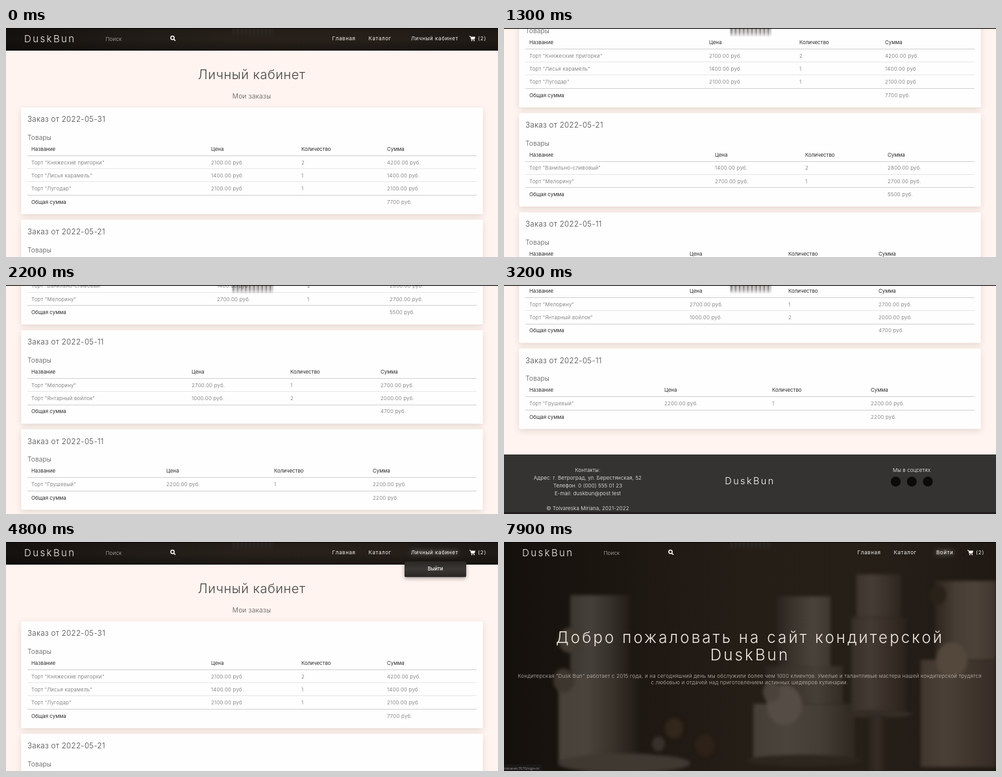
Animation, 758 px wide and 354 px high, one loop 8000 ms. Source, as an HTML page with a canvas:

```html
<!DOCTYPE html>
<html lang="ru">
<head>
<meta charset="utf-8">
<title>Личный кабинет</title>
<style>
  html, body { margin: 0; width: 100%; height: 100%; overflow: hidden; background: #fff4ef; }
  canvas { display: block; width: 758px; height: 354px; }
</style>
</head>
<body>
<canvas id="stage"></canvas>
<script>
const W = 758, H = 354, LOOP = 8000;
const BRAND = 'DuskBun';
const SANS = 'Inter, "Open Sans", sans-serif';
const ratio = window.devicePixelRatio || 1;
const stage = document.getElementById('stage');
stage.width = W * ratio;
stage.height = H * ratio;
const ctx = stage.getContext('2d');

const orders = [
  { date: '2022-05-31', cols: [39, 316, 455, 587], total: 7700,
    rows: [['Княжеские пригорки', 2100, 2], ['Лисья карамель', 1400, 1], ['Лугодар', 2100, 1]] },
  { date: '2022-05-21', cols: [39, 325, 464, 591], total: 5500,
    rows: [['Ванильно-сливовый', 1400, 2], ['Мелорину', 2700, 1]] },
  { date: '2022-05-11', cols: [39, 286, 438, 577], total: 4700,
    rows: [['Мелорину', 2700, 1], ['Янтарный войлок', 1000, 2]] },
  { date: '2022-05-11', cols: [39, 247, 413, 565], total: 2200,
    rows: [['Грушевый', 2200, 1]] }
];

// [time, scroll offset]
const scrollKeys = [[500, 0], [800, 81], [1700, 231], [2300, 410], [2500, 505],
  [3200, 505], [3300, 462], [3800, 144], [4000, 6], [4100, 0]];

const clamp = v => Math.max(0, Math.min(1, v));
const ramp = (t, from, to) => clamp((t - from) / (to - from));

function scrollAt(t) {
  for (let i = 1; i < scrollKeys.length; i++) {
    const [t0, y0] = scrollKeys[i - 1], [t1, y1] = scrollKeys[i];
    if (t <= t1) return Math.round(y0 + (y1 - y0) * ramp(t, t0, t1));
  }
  return 0;
}

// y is the optical middle of the line
function text(str, x, y, size, color, { weight = 300, align = 'left', spacing = 0, family = SANS, glow = 0 } = {}) {
  ctx.save();
  ctx.font = `${weight} ${size}px ${family}`;
  ctx.letterSpacing = spacing + 'px';
  ctx.textAlign = align;
  ctx.fillStyle = color;
  if (glow) {
    ctx.shadowColor = `rgba(255,255,255,${glow})`;
    ctx.shadowBlur = 7 * ratio;
  }
  ctx.fillText(str, x, y + size * 0.35);
  ctx.restore();
}

function rect(x, y, w, h, fill) {
  ctx.fillStyle = fill;
  ctx.fillRect(x, y, w, h);
}

function oval(x, y, rx, ry, fill) {
  ctx.fillStyle = fill;
  ctx.beginPath();
  ctx.ellipse(x, y, rx, ry, 0, 0, Math.PI * 2);
  ctx.fill();
}

const disc = (x, y, r, fill) => oval(x, y, r, r, fill);

function linear(x0, y0, x1, y1, ...colors) {
  const g = ctx.createLinearGradient(x0, y0, x1, y1);
  colors.forEach((c, i) => g.addColorStop(i / (colors.length - 1), c));
  return g;
}

function searchIcon() {
  ctx.strokeStyle = '#fff';
  ctx.lineWidth = 1.5;
  ctx.beginPath();
  ctx.arc(256.5, 15.2, 2.6, 0, Math.PI * 2);
  ctx.moveTo(258.5, 17.2);
  ctx.lineTo(261, 19.7);
  ctx.stroke();
}

function cartIcon() {
  ctx.strokeStyle = ctx.fillStyle = '#fff';
  ctx.lineWidth = 1;
  ctx.beginPath();
  ctx.moveTo(713.8, 12.8);
  ctx.lineTo(715.6, 12.8);
  ctx.lineTo(717, 17.8);
  ctx.lineTo(721.8, 17.8);
  ctx.stroke();
  ctx.beginPath();
  ctx.moveTo(715.8, 13.4);
  ctx.lineTo(723, 13.4);
  ctx.lineTo(722, 17);
  ctx.lineTo(716.8, 17);
  ctx.fill();
  disc(717.6, 19.4, 0.9, '#fff');
  disc(721.2, 19.4, 0.9, '#fff');
}

function navBar(links) {
  text(BRAND, 28, 16.5, 15, '#f6f1ec', { spacing: 2.4 });
  text('Поиск', 153.5, 17, 8, '#c3bcb6', { spacing: 0.2 });
  searchIcon();
  for (const [label, x, glow] of links)
    text(label, x, 16.5, 8, '#f4f1ee', { weight: 400, spacing: 0.6, glow });
  cartIcon();
  text('(2)', 727, 16.5, 8, '#f4f1ee', { weight: 400, spacing: 0.8 });
}

function orderCard(order, top) {
  const n = order.rows.length, step = 20.3, height = 104 + step * n;
  const rowY = i => top + 85 + step * i;
  const light = { spacing: 0.25 };
  ctx.save();
  ctx.shadowColor = 'rgba(90,65,55,.17)';
  ctx.shadowBlur = 10 * ratio;
  ctx.shadowOffsetY = 3 * ratio;
  ctx.fillStyle = '#fffefe';
  ctx.beginPath();
  ctx.roundRect(23.3, top, 711.4, height, 2);
  ctx.fill();
  ctx.restore();

  text('Заказ от ' + order.date, 33, top + 18.2, 11.6, '#444', { spacing: 0.3 });
  text('Товары', 33, top + 46.5, 10.2, '#555', { spacing: 0.1 });
  ['Название', 'Цена', 'Количество', 'Сумма'].forEach((label, i) =>
    text(label, order.cols[i], top + 64.4, 7.9, '#2a2a2a', { weight: 400 }));
  order.rows.forEach(([name, price, count], i) => {
    const cells = [`Торт "${name}"`, `${price}.00 руб.`, count, `${price * count}.00 руб.`];
    cells.forEach((cell, c) => text(cell, order.cols[c], rowY(i), 7.9, '#666', light));
  });
  text('Общая сумма', 39, rowY(n) + 0.2, 7.9, '#2a2a2a', { weight: 400 });
  text(order.total + ' руб.', order.cols[3], rowY(n) + 0.2, 7.9, '#666', light);
  for (let i = 0; i <= n; i++)
    rect(33, Math.round(top + 74 + step * i), 692, 1, i % n ? '#e7e6e6' : '#d0cfcf');
  return height;
}

function footer() {
  rect(0, 767, W, 89, '#353331');
  rect(0, 856, W, 4, '#241d1f');
  const line = (str, x, y) => text(str, x, y, 8, '#fff', { align: 'center', spacing: 0.1 });
  line('Контакты:', 129, 791);
  line('Адрес: г. Ветроград, ул. Берестянская, 52', 129, 803);
  line('Телефон: 0 (000) 555 01 23', 129, 815);
  line('E-mail: duskbun@post.test', 129, 827);
  line('© Tolvareska Miriana, 2021-2022', 129, 850.3);
  text(BRAND, 379, 808, 14.5, '#fff', { align: 'center', spacing: 2.4 });
  line('Мы в соцсетях', 628, 791);
  for (const x of [603.5, 628.3, 653]) disc(x, 808.8, 7.6, '#0c0b0b');
}

function dropdown(glow) {
  ctx.save();
  ctx.shadowColor = 'rgba(0,0,0,.35)';
  ctx.shadowBlur = 6 * ratio;
  ctx.shadowOffsetY = 2 * ratio;
  ctx.fillStyle = linear(0, 30, 0, 54, '#2b2724', '#3a3735', '#2a2725');
  ctx.beginPath();
  ctx.roundRect(614, 30, 95, 24.3, 2);
  ctx.fill();
  ctx.restore();
  text('Выйти', 661.5, 41, 7.5, '#fff', { weight: 500, align: 'center', glow: glow * 0.4 });
}

function accountPage(t) {
  rect(0, 0, W, H, '#fff4ef');
  ctx.save();
  ctx.translate(0, -scrollAt(t));
  rect(0, 0, W, 35, linear(0, 0, W, 0, '#15110e', '#211c17', '#28211b', '#27201a', '#1f1a16'));
  rect(0, 0, W, 35, linear(0, 0, 0, 35, 'rgba(0,0,0,.1)', 'rgba(0,0,0,0)', 'rgba(0,0,0,.3)'));
  const hover = t >= 4800 ? 1 - ramp(t, 5100, 5400) : 0;
  navBar([['Главная', 502.5, 0], ['Каталог', 558.5, 0], ['Личный кабинет', 624, hover * 0.7]]);
  text('Личный кабинет', 378.5, 71.5, 20, '#444', { align: 'center', spacing: 0.55 });
  text('Мои заказы', 378.5, 105, 10.2, '#555', { align: 'center', spacing: 0.2 });
  let top = 122.8;
  for (const order of orders) top += orderCard(order, top) + 8.8;
  footer();
  if (t >= 4800) dropdown(ramp(t, 5100, 5400));
  ctx.restore();
}

function backdrop() {
  rect(0, 0, W, H, linear(0, 0, W, 0, '#14100b', '#1d1711', '#251e17', '#261f18', '#1f1913'));
  const tier = (x, y, w, h, ...tones) => rect(x, y, w, h, linear(x, 0, x + w, 0, ...tones));
  ctx.save();
  ctx.filter = `blur(${2.5 * ratio}px)`;
  // left cake and its tray
  tier(102, 82, 92, 130, '#3c3731', '#454039', '#37312b', '#221c16');
  tier(84, 206, 124, 134, '#474139', '#4a443d', '#39332c', '#211b15');
  oval(185, 342, 102, 15, '#3f3932');
  // middle cake
  tier(420, 84, 83, 112, '#2a231d', '#3c352e', '#4a433c', '#3f3831');
  tier(402, 192, 120, 60, '#2c251f', '#3b342d', '#463f38', '#332c25');
  tier(384, 250, 157, 86, '#453e37', '#4b443d', '#443d36', '#2f2821');
  oval(462, 338, 88, 9, '#2d261f');
  // tall cake on a stand
  tier(543, 50, 69, 68, '#3c352e', '#453d36', '#3a322b', '#2d261f');
  tier(535, 116, 84, 148, '#362f28', '#433b34', '#392f28', '#2a221c');
  oval(577, 266, 52, 6, '#352d26');
  tier(562, 270, 26, 84, '#2b241d', '#352d26', '#261f18');
  // right cake
  tier(664, 60, 94, 124, '#2e261e', '#463d34', '#4d4339', '#40362d');
  tier(642, 182, 116, 166, '#42372f', '#4b4038', '#41362e', '#362c25');
  // flowers
  const bloom = (x, y, r, color) => oval(x, y, r, r * 1.15, color);
  bloom(101, 152, 17, '#413a31');
  bloom(92, 214, 16, '#3d362e');
  bloom(432, 252, 27, '#554d45');
  bloom(412, 232, 13, '#4b433b');
  bloom(690, 182, 24, '#54473c');
  bloom(668, 82, 13, '#292219');
  bloom(262, 288, 14, '#33261a');
  bloom(310, 314, 15, '#2e2117');
  bloom(238, 312, 10, '#38312a');
  ctx.restore();
}

let backdropCache;
function drawBackdrop() {
  if (!backdropCache) {
    backdrop();
    backdropCache = document.createElement('canvas');
    backdropCache.width = stage.width;
    backdropCache.height = stage.height;
    backdropCache.getContext('2d').drawImage(stage, 0, 0);
  }
  ctx.drawImage(backdropCache, 0, 0, W, H);
}

function homePage(t) {
  drawBackdrop();
  navBar([['Главная', 544.5, 0], ['Каталог', 600.5, 0], ['Войти', 666, t >= 7500 ? 0.8 : 0]]);
  const title = { align: 'center', spacing: 3.15 };
  const lead = { align: 'center', spacing: 0.25 };
  text('Добро пожаловать на сайт кондитерской', 379, 148, 24, '#f3ebe4', title);
  text(BRAND, 379, 175, 24, '#f3ebe4', title);
  text('Кондитерская "Dusk Bun" работает с 2015 года, и на сегодняшний день мы обслужили более чем 1000 клиентов. ' +
    'Умелые и талантливые мастера нашей кондитерской трудятся', 378.5, 207, 7.9, '#c5bdb6', lead);
  text('с любовью и отдачей над приготовлением истинных шедевров кулинарии.', 378.5, 217, 7.9, '#c5bdb6', lead);
}

function statusBubble(label, width, alpha) {
  ctx.save();
  ctx.globalAlpha = alpha;
  ctx.fillStyle = '#1c1b1c';
  ctx.beginPath();
  ctx.roundRect(-3, 344, width + 3, 13, 2);
  ctx.fill();
  text(label, 0, 349.7, 5.6, '#b9b7b6', { weight: 400, family: '"Open Sans", "Noto Sans", sans-serif' });
  ctx.restore();
}

function status(t) {
  if (t < 5200) return;
  if (t < 5700) statusBubble('intranet:7070/log-out', 60, ramp(t, 5100, 5400));
  else if (t < 6100) statusBubble('Ожидание intranet…', 76, 1);
  else if (t < 6600) statusBubble('Ожидание q.lumvo.test…', 251, 1 - ramp(t, 6300, 6600));
  else if (t >= 7800) statusBubble('intranet:7070/sign-in', 58, ramp(t, 7700, 7900) * 0.8);
}

// Hidden toolbar peeking out at the top edge of the screen
function screenEdge() {
  rect(0, 0, W, 1.2, '#080606');
  for (let i = 0; i < 32; i++) {
    const a = 0.4 + 0.2 * Math.sin(i * 2);
    const tone = k => `rgba(50,46,44,${a * k})`;
    rect(348 + i * 2, 1, 2, 13, linear(0, 2, 0, 14, tone(1), tone(0.7), tone(0)));
  }
}

function draw(now) {
  const t = now % LOOP;
  ctx.setTransform(ratio, 0, 0, ratio, 0, 0);
  (t < 6300 ? accountPage : homePage)(t);
  status(t);
  screenEdge();
  requestAnimationFrame(draw);
}

requestAnimationFrame(draw);
</script>
</body>
</html>
```
